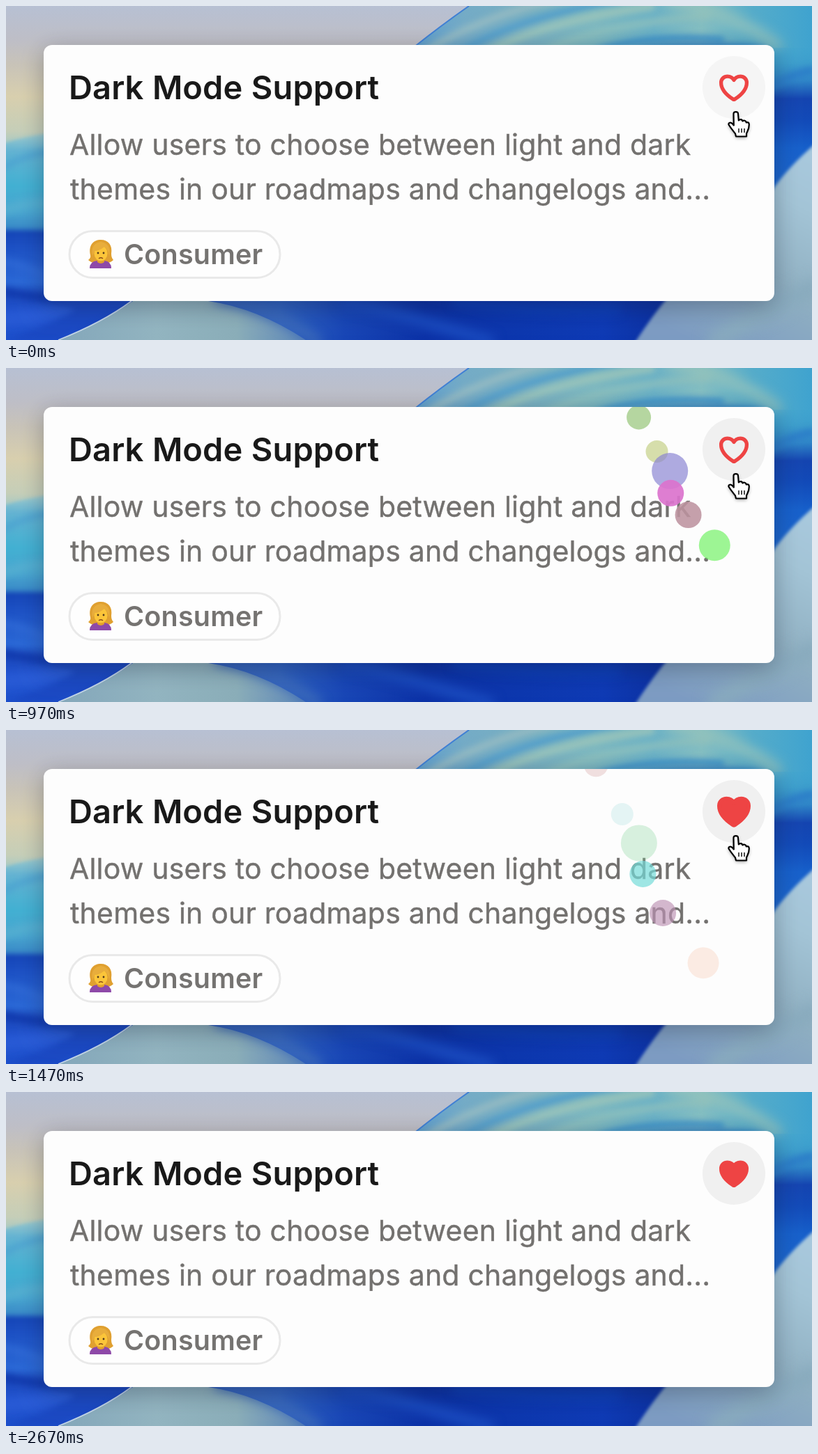
An HTML page with a canvas for the animation above (2710 ms loop, 1156x480 px).

```html
<!DOCTYPE html>
<html lang="en">
<head>
<meta charset="utf-8">
<title>Feature card</title>
<style>
html, body { margin: 0; width: 100%; height: 100%; overflow: hidden; background: #0c36ac; }
canvas, svg { position: absolute; left: 0; top: 0; width: 1156px; height: 480px; display: block; }
text { font-family: Inter, Roboto, sans-serif; font-optical-sizing: none; }
.title { font-size: 47px; font-weight: 600; fill: #191919; letter-spacing: .1px; word-spacing: .5px; }
.body { font-size: 41px; fill: #73716f; stroke: #73716f; stroke-width: .4px; letter-spacing: .2px; }
.chip { font-size: 39.5px; font-weight: 600; fill: #757371; letter-spacing: .2px; }
</style>
</head>
<body>
<canvas id="back" width="1156" height="480"></canvas>
<svg viewBox="0 0 1156 480">
  <text class="title" x="90" y="134">Dark Mode Support</text>
  <text class="body" x="91" y="214">Allow users to choose between light and dark</text>
  <text class="body" x="92" y="278">themes in our roadmaps and changelogs and...</text>
  <rect x="91" y="323.5" width="302" height="67" rx="33.5" fill="#fefefe" stroke="#e9e9e9" stroke-width="3"/>
  <g>
    <path d="M121 358C118 344 125 336 136 336C147 336 153 344 151 356Q151 362 154 365Q148 371 136 369Q124 371 118 365Q122 362 121 358Z" fill="#e0a030"/>
    <path d="M120 377Q120 367 131 366H141Q151 367 151 377Z" fill="#8e49a8"/>
    <path d="M131 361H141V368Q136 372 131 368Z" fill="#e3a02c"/>
    <ellipse cx="136" cy="355.5" rx="9.5" ry="11" fill="#fbc53a"/>
    <path d="M124 359Q121 341 136 339Q151 341 148 359Q147 351 141 346Q134 352 127 352Z" fill="#e8ad3c"/>
    <circle cx="132" cy="355" r="1.4" fill="#533a1d"/>
    <circle cx="140" cy="355" r="1.4" fill="#533a1d"/>
    <path d="M133 363Q136 360.5 139 363" fill="none" stroke="#8a4b1b" stroke-width="1.4"/>
  </g>
  <text class="chip" x="169" y="371">Consumer</text>
</svg>
<canvas id="front" width="1156" height="480"></canvas>
<script>
const W = 1156, H = 480, LOOP = 2710;
const bg = document.getElementById('back').getContext('2d');
const ctx = document.getElementById('front').getContext('2d');

const clamp = v => Math.max(0, Math.min(1, v));
const ramp = (t, a, b) => { const p = clamp((t - a) / (b - a)); return p * p * (3 - 2 * p); };

const card = new Path2D();
card.roundRect(54, 56, 1048, 368, 12);

// ---- wallpaper ----
function grad(x0, y0, x1, y1, ...stops) {
  const g = bg.createLinearGradient(x0, y0, x1, y1);
  for (const s of stops) {
    const [color, at] = s.split(' ');
    g.addColorStop(+at, color);
  }
  return g;
}
function shape(d, fill, blur = 0) {
  bg.filter = blur ? `blur(${blur}px)` : 'none';
  bg.fillStyle = fill;
  bg.fill(new Path2D(d));
  bg.filter = 'none';
}
function streak(d, color, width, blur = 0) {
  bg.filter = blur ? `blur(${blur}px)` : 'none';
  bg.strokeStyle = color;
  bg.lineWidth = width;
  bg.stroke(new Path2D(d));
  bg.filter = 'none';
}

function paintBack() {
  shape('M0 0H1156V480H0Z', grad(0, 0, 0, 200,
    '#b7c0d3 0', '#bebec6 .25', '#c8c3b8 .42', '#d8cfae .65', '#c5ceb8 .9', '#a6c9c4 1'));

  // deep water along the bottom
  shape('M0 330H1156V480H0Z', grad(0, 0, W, 0,
    '#1c4fcb 0', '#1744bd .12', '#2f62c0 .34', '#1745b5 .42', '#0b31a6 .52', '#0b36ae .64', '#0d39b4 .74', '#0a2f9f .82', '#1444b4 1'));
  streak('M480 424Q560 440 700 484', '#1a4cc0', 16, 8);
  streak('M640 424Q760 440 880 436', '#0c3fb8', 12, 7);

  // left wave
  shape('M-20 204Q20 186 100 178V480H-20Z', grad(0, 184, 0, 480,
    '#9cc9cc 0', '#64b3d2 .08', '#42b0d2 .25', '#48a5d0 .38', '#3a8cc8 .45', '#1546b8 .48', '#1c50c4 .55', '#2a68d6 .72', '#1a48bc .78', '#2456d2 .88', '#1c4fcb 1'), 2);
  streak('M-10 236Q24 214 64 210', '#4ca2d0', 8, 5);
  streak('M-10 296Q30 280 64 284', '#58b0d0', 9, 6);
  streak('M-10 366Q26 372 64 392', '#2f6ad6', 9, 6);
  streak('M-10 408Q50 424 120 420', '#1038ac', 10, 5);
  streak('M-10 452Q60 446 130 428', '#2a5cd6', 12, 7);
  shape('M54 420H184Q150 446 76 480H0Q70 455 100 436Z', '#1a48c2', 4);

  // pale fold at the bottom left
  shape('M75 480Q138 455 182 424H290Q360 434 430 480Z',
    grad(100, 0, 430, 0, '#86a9bb 0', '#92b4c0 .35', '#8aadb8 .7', '#5c86b8 1'));
  streak('M300 420Q390 436 450 486', '#3a68b8', 14, 8);
  streak('M75 480Q138 455 180 424', '#c3d5e6', 1.6);

  // upper right wave
  bg.save();
  bg.clip(new Path2D('M664 0Q624 28 584 60H1090V290L1156 250V0Z'));
  shape('M560 0H1156V300H560Z', grad(590, 0, W, 0,
    '#5f9fcd 0', '#74abc6 .12', '#78b0c2 .28', '#7cb8c0 .45', '#6cb2c6 .6', '#84bec2 .72', '#55acca .85', '#3fa3cf 1'));
  streak('M600 66Q680 16 790 -10', '#95bac2', 10, 5);
  streak('M650 66Q740 14 880 -8', '#4f9ccb', 9, 5);
  streak('M690 66Q780 20 930 0', '#9ac4ba', 10, 5);
  streak('M770 66Q850 26 1010 14', '#8dbfbc', 8, 5);
  streak('M840 66Q910 40 1030 48', '#3a90ca', 8, 4);
  streak('M860 74Q940 50 1090 62', '#2b7cc6', 9, 5);
  streak('M950 -8Q1040 8 1110 60', '#98c4ba', 13, 9);
  shape('M1080 60H1170V300H1080Z', grad(0, 50, 0, 270,
    '#3fa5d000 0', '#3c9dcc .15', '#2f86c8 .26', '#1444b0 .38', '#124ab8 .52', '#165fca .7', '#1c66cc 1'));
  streak('M1096 118Q1130 96 1160 92', '#2b7cc8', 10, 5);
  bg.restore();
  streak('M664 0Q624 28 584 60', '#3f7fd4', 2);

  // pale fold at the lower right
  shape('M1170 190Q1124 228 1098 266V410L950 418Q926 446 898 490H1170Z',
    grad(1150, 200, 1000, 490, '#a9c9de 0', '#a3c4d6 .25', '#90b0c2 .6', '#7c9bc2 1'), 2);
  streak('M1010 486Q1080 440 1170 400', '#88aabd', 24, 10);

  bg.save();
  bg.shadowColor = 'rgba(20,25,45,.32)';
  bg.shadowBlur = 34;
  bg.shadowOffsetY = 8;
  bg.fillStyle = '#fdfdfd';
  bg.fill(card);
  bg.restore();
}

// ---- confetti: end offset, drag, radius, saturation, hues and alphas over time ----
const KEYS = [800, 835, 1130, 1470, 1870, 2200, 2500];
const dots = [
  { to: [-200, -69], k: 6.7, r: 17.5, s: 40, hue: [177, 360, 380, 440], a: [.65, .25, .45, .12] },
  { to: [-162, 3], k: 6.7, r: 16, s: 45, hue: [150, 180, 200, 220], a: [.38, .2, 0, 0] },
  { to: [-138, 45], k: 6.4, r: 26, s: 48, hue: [325, 498, 520, 540], a: [.36, .3, 0, 0] },
  { to: [-132, 90], k: 6.8, r: 19, s: 60, hue: [29, 177, 340, 400], a: [.95, .7, .1, 0] },
  { to: [-104, 148], k: 5.8, r: 19, s: 25, hue: [63, 312, 510, 560], a: [.85, .66, .12, 0] },
  { to: [-45, 222], k: 5.6, r: 22.5, s: 85, hue: [195, 380, 560, 600], a: [.38, .16, .2, 0] }
];
function keyed(t, list) {
  let i = 0;
  while (i < KEYS.length - 2 && t > KEYS[i + 1]) i++;
  const p = clamp((t - KEYS[i]) / (KEYS[i + 1] - KEYS[i]));
  return list[i] + (list[i + 1] - list[i]) * p;
}
function drawDots(t) {
  if (t <= 800) return;
  ctx.save();
  ctx.clip(card);
  for (const { to, k, r, s, hue, a } of dots) {
    const reach = 1 - Math.exp(-k * (t - 800) / 1000);
    const h = keyed(t, [hue[0] - 170, hue[0] - 150, ...hue, hue[3]]);
    const alpha = keyed(t, [0, .9, ...a, 0]);
    ctx.fillStyle = `hsla(${h % 360},${s}%,66%,${alpha})`;
    ctx.beginPath();
    ctx.arc(1044 + to[0] * reach, 118 + to[1] * reach, r, 0, 7);
    ctx.fill();
  }
  ctx.restore();
}

// ---- like button and pointer ----
const heart = new Path2D('M0 -11.5C-2 -15 -5.5 -16.8 -9.2 -16.8C-14.5 -16.8 -18.4 -13 -18.4 -7.8C-18.4 5 -5 13.5 -1.2 16Q0 16.8 1.2 16C5 13.5 18.4 5 18.4 -7.8C18.4 -13 14.5 -16.8 9.2 -16.8C5.5 -16.8 2 -15 0 -11.5Z');
const hand = new Path2D('M-3.5 3.5C-3.5 -.3 3 -.3 3 3.5L3.8 13C5 11 9 11.2 9.3 14C11 12.2 14.4 13 14.8 16C17 14.8 18.8 16.2 18.8 19C18.8 26 16 28.5 15 32V36H0L-1 32C-4 28 -8.5 22.5 -10.5 19C-11 15.8 -7.5 15.4 -5.3 17.6L-3.2 20Z');
const knuckles = new Path2D('M4 25V30M8 25V30M12 25V30');

function drawButton(t) {
  const tone = 245 - 5 * ramp(t, 0, 200);
  ctx.fillStyle = `rgb(${tone},${tone},${tone})`;
  ctx.beginPath();
  ctx.arc(1044, 117, 45, 0, 7);
  ctx.fill();

  const full = (t >= 720 && t < 900) || t >= 1290;
  const size = 1 + .14 * ramp(t, 1290, 1430) - .14 * ramp(t, 1470, 1680);
  ctx.save();
  ctx.translate(1044, 118);
  ctx.scale(size, size);
  ctx.lineJoin = 'round';
  ctx.lineWidth = 5.3;
  ctx.strokeStyle = ctx.fillStyle = '#ee4444';
  if (full) ctx.fill(heart);
  ctx.stroke(heart);
  ctx.restore();
}

function drawPointer(t) {
  const press = ramp(t, 670, 770) - ramp(t, 820, 930);
  const show = 1 - ramp(t, 1650, 1910);
  if (press > 0) {
    ctx.globalAlpha = press;
    ctx.beginPath();
    ctx.arc(1047, 154, 17, 0, 7);
    ctx.fillStyle = 'rgba(120,120,120,.1)';
    ctx.fill();
    ctx.strokeStyle = 'rgba(110,110,110,.55)';
    ctx.lineWidth = 1.2;
    ctx.stroke();
  }
  if (show > 0) {
    const size = 1 - .15 * press;
    ctx.save();
    ctx.globalAlpha = show;
    ctx.translate(1047, 151.5);
    ctx.scale(size, size);
    ctx.lineJoin = ctx.lineCap = 'round';
    ctx.shadowColor = 'rgba(0,0,0,.4)';
    ctx.shadowBlur = 5;
    ctx.shadowOffsetY = 2;
    ctx.fillStyle = '#fff';
    ctx.fill(hand);
    ctx.shadowColor = 'transparent';
    ctx.strokeStyle = '#000';
    ctx.lineWidth = 2.2;
    ctx.stroke(hand);
    ctx.lineWidth = 1.4;
    ctx.stroke(knuckles);
    ctx.restore();
  }
  ctx.globalAlpha = 1;
}

const start = performance.now();
function frame() {
  const t = (performance.now() - start) % LOOP;
  ctx.clearRect(0, 0, W, H);
  drawDots(t);
  drawButton(t);
  drawPointer(t);
  requestAnimationFrame(frame);
}
paintBack();
frame();
</script>
</body>
</html>
```
